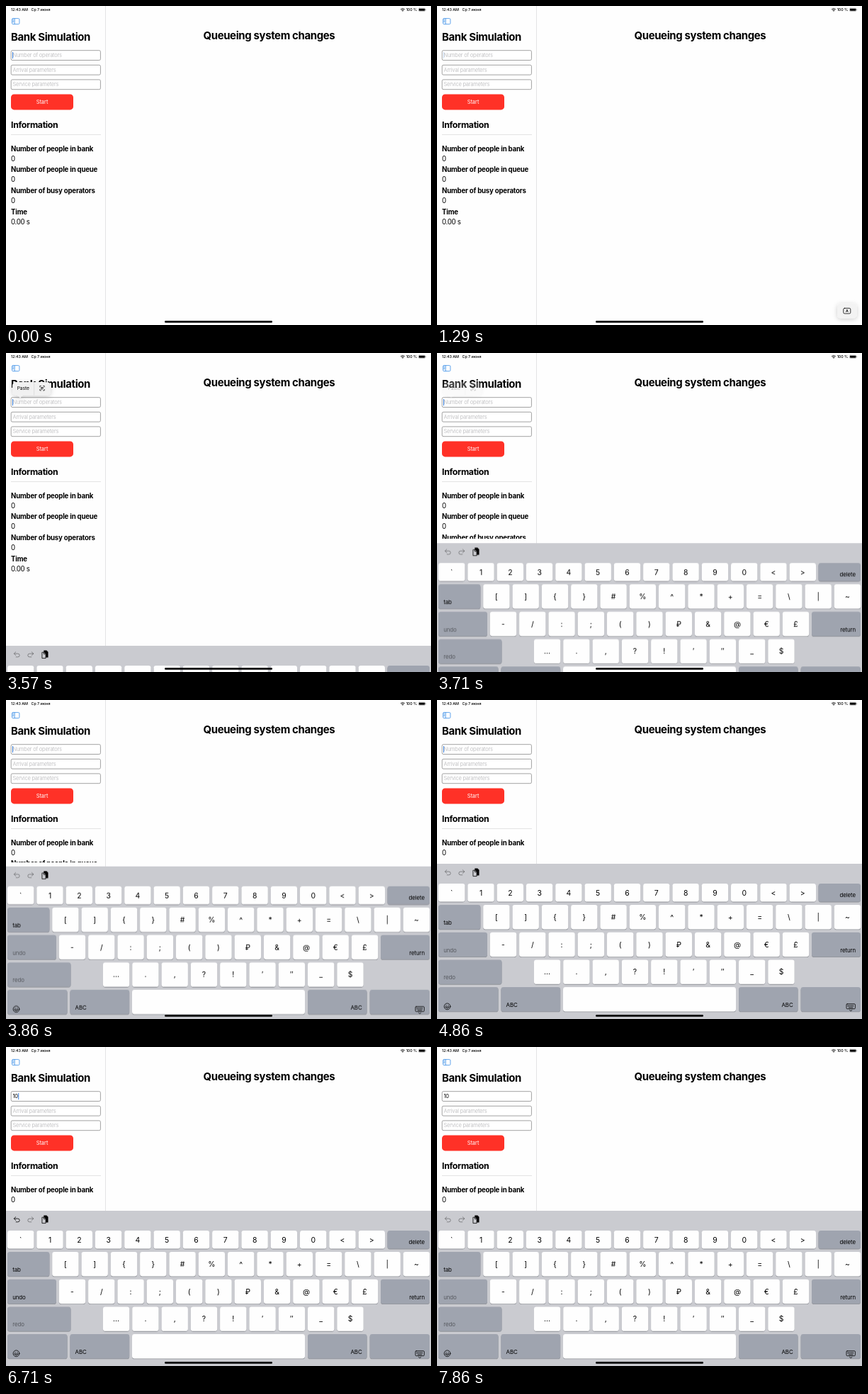
Write an HTML page that moves like this. It is 600 by 450 pixels and loops after 8 s.

```html
<!DOCTYPE html>
<html lang="en">
<head>
<meta charset="utf-8">
<title>Bank Simulation</title>
<style>
html, body { margin: 0; width: 100%; height: 100%; overflow: hidden; background: #fefefe; }
svg { display: block; width: 600px; height: 450px; font-family: Inter, "Noto Sans", sans-serif; }
text { white-space: pre; }
.title { font-size: 14.9px; font-weight: 700; letter-spacing: -.34px; }
.head { font-size: 12.3px; font-weight: 700; letter-spacing: -.3px; }
.label { font-size: 9.66px; font-weight: 700; letter-spacing: -.21px; }
.value { font-size: 9.66px; letter-spacing: -.3px; }
.input { font-size: 7.47px; letter-spacing: -.24px; }
.hint { fill: #c3c3c5; }
.status { font-size: 5.4px; font-weight: 500; letter-spacing: -.05px; }
.key { font-size: 10.4px; text-anchor: middle; }
.word { font-size: 7.9px; letter-spacing: -.1px; }
.line { fill: none; stroke: #000; stroke-width: .8; stroke-linecap: round; stroke-linejoin: round; }
.dim { opacity: .45; }

#keyboard { animation: slide 8s linear infinite; }
#popup { animation: popup 8s linear infinite; }
#toggle { animation: toggle 8s linear infinite; }
#idle { animation: idle 8s step-end infinite; }
#blink { animation: blink 1s linear infinite; }
#caret { animation: caret 8s linear infinite; }
#hint { animation: idle 8s step-end infinite; }
#one { animation: one 8s step-end infinite; }
#ten { animation: ten 8s step-end infinite; }
.undo { animation: undo 8s step-end infinite; }

@keyframes slide {
  0% { transform: translateY(450px); }
  44.1375% {
    transform: translateY(450px);
    animation-timing-function: linear(0, .09 5%, .264 10%, .442 15%, .594 20%, .713 25%, .801 30%, .908 40%, .96 50%, .983 60%, .997 80%, 1);
  }
  51.0125%, 100% { transform: translateY(231px); }
}
@keyframes popup { 0%, 17.5% { opacity: 0; } 20%, 44.8% { opacity: 1; } 47%, 100% { opacity: 0; } }
@keyframes toggle { 0%, 5% { opacity: 0; } 8%, 37% { opacity: 1; } 40%, 100% { opacity: 0; } }
@keyframes idle { 0% { opacity: 1; } 67.9%, 100% { opacity: 0; } }
@keyframes one { 0% { opacity: 0; } 67.9% { opacity: 1; } 78.6%, 100% { opacity: 0; } }
@keyframes ten { 0% { opacity: 0; } 78.6%, 100% { opacity: 1; } }
@keyframes undo { 0% { opacity: .45; } 67.9% { opacity: 1; } 88.1%, 100% { opacity: .45; } }
@keyframes blink { 0%, 10% { opacity: 1; } 32%, 40% { opacity: .15; } 54%, 100% { opacity: 1; } }
@keyframes caret {
  0%, 67.89% { opacity: 0; transform: translate(3.6px, 0); }
  67.9%, 73% { opacity: 1; transform: translate(3.6px, 0); }
  74.8%, 78.59% { opacity: 0; transform: translate(3.6px, 0); }
  78.6%, 84% { opacity: 1; transform: translate(8.2px, 0); }
  86%, 88.09% { opacity: 0; transform: translate(8.2px, 0); }
  88.1%, 94.5% { opacity: 1; transform: translate(0, 20.5px); }
  97.5%, 100% { opacity: 0; transform: translate(0, 20.5px); }
}
</style>
</head>
<body>
<svg viewBox="0 0 600 450">
  <defs>
    <filter id="soft" x="-40%" y="-60%" width="180%" height="240%">
      <feDropShadow dx="0" dy="1.5" stdDeviation="3" flood-color="#000" flood-opacity=".2"/>
    </filter>
  </defs>
  <rect width="600" height="450" fill="#fefefe"/>

  <g class="status">
    <text x="7" y="7.2">12:43 AM</text>
    <text x="35.5" y="7.2">Ср 7 июня</text>
    <text x="564.7" y="7.2">100 %</text>
  </g>
  <g class="line">
    <path d="M557.4 4.4q2.6-2.2 5.2 0M558.5 5.7q1.5-1.2 3 0"/>
    <rect x="582.4" y="3.2" width="9.6" height="4.2" rx="1.3" style="stroke:#888;stroke-width:.5"/>
  </g>
  <circle cx="560" cy="7" r=".7"/>
  <rect x="583" y="3.8" width="8.4" height="3" rx=".8"/>
  <rect x="592.4" y="4.5" width=".7" height="1.6" rx=".3" fill="#888"/>

  <path d="M140.5 0V450M7 181.5H134" stroke="#dcdcde" stroke-width=".8"/>
  <g class="line" style="stroke:#3a8fe8">
    <rect x="8.5" y="17.6" width="10.4" height="8" rx="1.4"/>
    <path d="M12.2 17.6v8M9.8 19.7h1.1M9.8 21.2h1.1M9.8 22.7h1.1"/>
  </g>

  <text class="title" x="7" y="48.5">Bank Simulation</text>
  <text class="title" x="278.5" y="47">Queueing system changes</text>
  <g id="fields"></g>
  <g class="input">
    <text class="hint" id="hint" x="9.5" y="72.2">Number of operators</text>
    <text class="hint" x="9.5" y="92.7">Arrival parameters</text>
    <text class="hint" x="9.5" y="113.3">Service parameters</text>
    <text id="one" x="9.5" y="72.2">1</text>
    <text id="ten" x="9.5" y="72.2">10</text>
  </g>
  <g id="idle"><rect id="blink" x="9" y="65" width="1" height="9.2" fill="#3c82e0"/></g>
  <rect id="caret" x="9" y="65" width="1" height="9.2" fill="#3c82e0"/>
  <rect x="7" y="124.4" width="88" height="22" rx="4.4" fill="#ff3127"/>
  <text class="input" x="51" y="138.1" fill="#fff" text-anchor="middle" style="letter-spacing:-.03px">Start</text>
  <text class="head" x="7" y="171.7">Information</text>
  <g id="stats"></g>

  <g id="popup">
    <path filter="url(#soft)" fill="#f1f1f1" d="M14 41H58a5 5 0 0 1 5 5v8.5a5 5 0 0 1-5 5H25q-2 0-5 4.2q-3-4.2-5-4.2H14a5 5 0 0 1-5-5V46a5 5 0 0 1 5-5Z"/>
    <path d="M39.6 41V59.5" stroke="#d4d4d5" stroke-width=".7"/>
    <text x="24.3" y="51.9" text-anchor="middle" font-size="6.7" letter-spacing="-.05">Paste</text>
    <g class="line" style="stroke-width:.7">
      <path d="M47.8 48v-1.6h1.6M52.6 46.4h1.6V48M54.2 51.3v1.6h-1.6M49.4 52.9h-1.6v-1.6M49.4 48.6h3.2M49.4 49.8h3.2M49.4 51h2"/>
    </g>
  </g>

  <g id="toggle">
    <rect filter="url(#soft)" x="565" y="419.5" width="27.5" height="21" rx="5" fill="#f3f3f3"/>
    <rect class="line" x="573.8" y="426.3" width="10" height="7.6" rx="1.6"/>
    <text x="578.8" y="432" text-anchor="middle" font-size="5.2" font-weight="600">A</text>
  </g>

  <g id="keyboard">
    <rect y="-6" width="139" height="6" fill="#fefefe"/>
    <rect width="600" height="225" fill="#cacbd0"/>
    <g class="undo"><path id="arrow" class="line" d="M13.8 8.7L11.3 11.1L13.8 13.5M11.3 11.1H16.8a2.3 2.3 0 0 1 0 4.7H14.2"/></g>
    <use class="dim" href="#arrow" transform="translate(50) scale(-1 1)"/>
    <path d="M53.3 6.6h4l2.2 2.2v7.6h-6.2z"/>
    <path d="M50.9 9.2h3.2l2 2v6.4h-5.2z" fill="#cacbd0" stroke="#000" stroke-width=".8"/>
    <path d="M53.4 9.2v2.4h2.6" class="line"/>
    <g id="keys"></g>
    <g class="line">
      <circle cx="14.5" cy="201.3" r="4.4"/>
      <path d="M11.9 202.2q2.6 3.6 5.2 0z"/>
      <path d="M12.9 199.4v.6M16.1 199.4v.6"/>
      <rect x="578" y="197.7" width="12.4" height="7" rx="1.2"/>
      <path d="M580 199.7h8.4M580 201.2h8.4" stroke-dasharray=".5 1.3"/>
      <path d="M581.4 203h5.6M582.6 206.5l1.6 1.2l1.6-1.2"/>
    </g>
  </g>

  <rect x="224" y="444.1" width="152" height="2.6" rx="1.3"/>
</svg>
<script>
const NS = "http://www.w3.org/2000/svg";
const byId = id => document.getElementById(id);

function add(parent, tag, attrs, content = "") {
  const el = document.createElementNS(NS, tag);
  for (const name in attrs) el.setAttribute(name, attrs[name]);
  el.textContent = content;
  return parent.appendChild(el);
}

// Input boxes
for (let i = 0; i < 3; i++) {
  add(byId("fields"), "rect", {
    x: 7.2, y: 62.7 + i * 20.6, width: 126.2, height: 13.8, rx: 1.8,
    fill: "#fff", stroke: "#8b8b8b", "stroke-width": .8
  });
}

// Readouts
["Number of people in bank", "Number of people in queue", "Number of busy operators", "Time"].forEach((name, i) => {
  const y = 204.5 + i * 29.9;
  add(byId("stats"), "text", { class: "label", x: 7, y }, name);
  add(byId("stats"), "text", { class: "value", x: 7, y: y + 14 }, i < 3 ? "0" : "0.00 s");
});

// Keyboard
const keys = byId("keys");
function cap(x, y, width, height, fill) {
  add(keys, "rect", { x, y: y + .9, width, height, rx: 3.4, fill: "#909298" });
  add(keys, "rect", { x, y, width, height, rx: 3.4, fill });
}

const rows = [
  [28, 25.6, 2, "`1234567890<>"],
  [58, 34.4, 65.2, "[]{}#%^*+=\\|~"],
  [96.8, 34.4, 74.8, "-/:;()₽&@€£"],
  [135.4, 34.4, 136.9, "….,?!′″_$"]
];
for (const [y, h, x0, chars] of rows) {
  [...chars].forEach((char, i) => {
    const x = x0 + i * 41.3;
    cap(x, y, 37.4, h, "#fefefe");
    add(keys, "text", { class: "key", x: x + 18.7, y: y + h / 2 + 3.7 }, char);
  });
}

function wide(x, row, width, label, right, state = "") {
  const [y, h] = rows[row] || [174, 34.4];
  cap(x, y, width, h, "#9fa4af");
  add(keys, "text", {
    class: "word " + state, x: right ? x + width - 7 : x + 7.2, y: y + h - 6.4,
    "text-anchor": right ? "end" : "start"
  }, label);
}
wide(538.5, 0, 59.5, "delete", true);
wide(2, 1, 59.4, "tab");
wide(2, 2, 69, "undo", false, "undo");
wide(529, 2, 69, "return", true);
wide(2, 3, 89.5, "redo", false, "dim");
wide(2, 4, 84.6, "");
wide(90.4, 4, 83.8, "ABC");
wide(426, 4, 83.6, "ABC", true);
wide(513.6, 4, 84.4, "");
cap(178, 174, 244, 34.4, "#fefefe");
</script>
</body>
</html>
```
